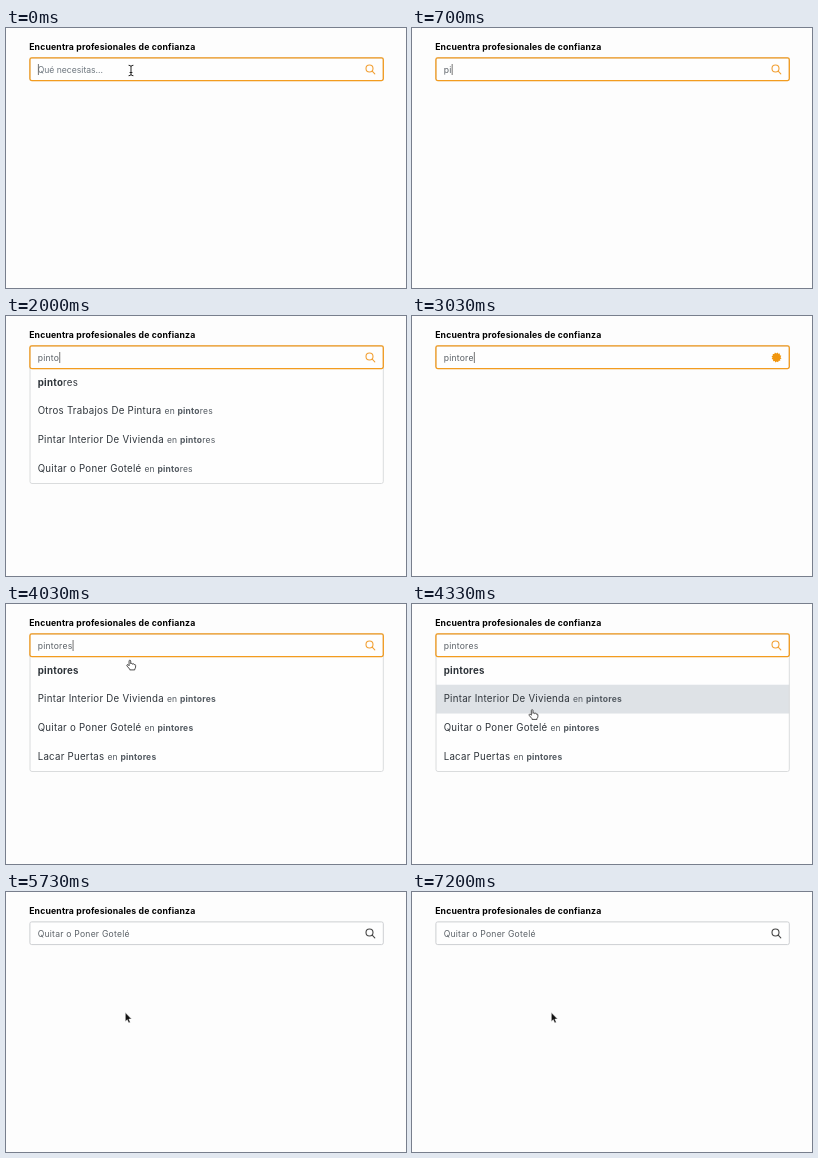
An HTML page for the animation above (7.23 s loop, 400 px wide and 260 px high).

```html
<!DOCTYPE html>
<html lang="es">
<head>
<meta charset="utf-8">
<title>Buscador</title>
<style>
  html, body { margin: 0; width: 100%; height: 100%; overflow: hidden; background: #fdfdfd; }
  svg { display: block; width: 400px; height: 260px; font-family: Inter, "Open Sans", sans-serif; }
  .title { font-size: 8.7px; font-weight: 700; letter-spacing: .16px; fill: #000; }
  .value { font-size: 8.6px; letter-spacing: .22px; fill: #5b6167; }
  .hint { letter-spacing: 0; fill: #6c757d; }
  .row { font-size: 9.7px; letter-spacing: .25px; fill: #2f353b; }
  .sub { font-size: 8.5px; letter-spacing: .21px; fill: #535a61; }
  .b { font-weight: 700; }
  .line { fill: none; stroke-linecap: round; }
</style>
</head>
<body>
<svg viewBox="0 0 400 260">
  <text class="title" x="23.2" y="21.6">Encuentra profesionales de confianza</text>
  <g id="menu">
    <path d="M24 50V165.5a2 2 0 0 0 2 2H375.3a2 2 0 0 0 2-2V50Z" fill="#fefefe"/>
    <rect id="hover" x="24" width="353.3" height="28.8" fill="#dee2e6"/>
    <path d="M24 50V165.5a2 2 0 0 0 2 2H375.3a2 2 0 0 0 2-2V50" fill="none" stroke="#d6d8da" stroke-width=".9"/>
    <g id="rows"></g>
  </g>
  <rect x="23.9" y="29.9" width="353.4" height="22.7" rx="1.8" fill="#fefefe" stroke="#cdcfd2"/>
  <rect id="focus" x="23.9" y="29.9" width="353.4" height="22.7" rx="1.8" fill="none" stroke="#f39c1f" stroke-width="1.3"/>
  <text id="value" class="value" x="31.7" y="44.5"></text>
  <rect id="caret" y="36" width=".9" height="11" fill="#666"/>
  <g id="lens" class="line" stroke-width="1.1">
    <circle cx="363.5" cy="40.5" r="3.5"/>
    <path d="M366.2 43.2L368.8 45.8"/>
  </g>
  <path id="spinner" fill="#f0960f"/>
  <path id="beam" class="line" d="M-2-5.2Q0-5.2 0-4Q0-5.2 2-5.2M0-4V4M-2 5.2Q0 5.2 0 4Q0 5.2 2 5.2M-1 2H1" stroke="#222"/>
  <g id="hand">
    <path transform="scale(.87)" d="M-.9 1Q-.9 0 0 0T1 1V4.2Q1.3 3.5 2.2 3.7T3 4.6Q3.6 3.8 4.4 4.2T5 5.2Q6.5 4.6 6.6 6V8Q6.4 9.4 5.6 10.2V11.2H-.1V10.4L-3.2 6.8Q-4 5.7-3 5.2T-.9 6.4Z" fill="#fff" stroke="#333" stroke-linejoin="round"/>
  </g>
  <path id="arrow" d="M0 0V8.9L2 7.1L3.4 10.4L5 9.7L3.6 6.5H6.3Z" fill="#111" stroke="#fff" stroke-width=".5"/>
</svg>
<script>
const LOOP = 7230, STEP = 100 / 3;
const BLUR = 5550, PICK = 5670;
const ROW_TOP = 51.9, ROW_H = 28.8;
const PLACE = "Qué necesitas...", CHOICE = "Quitar o Poner Gotelé";
const INTERIOR = "Pintar Interior De Vivienda", DOORS = "Lacar Puertas";
const BASE = [INTERIOR, CHOICE, DOORS];
const WIDE = ["Otros Trabajos De Pintura", INTERIOR, CHOICE];

// key time, query, time the answer arrives, suggestions
const KEYS = [
  [300, "p", 500, null],
  [500, "pi", 700, null],
  [970, "pin", 1200, BASE],
  [1370, "pint", 1530, BASE],
  [1800, "pinto", 2000, WIDE],
  [2570, "pintor", 2730, BASE],
  [3030, "pintore", 3230, BASE],
  [3530, "pintores", 3770, BASE]
];
const CARET_OFF = [[2300, 2570], [4070, 4550], [5030, 5530]];

const $ = id => document.getElementById(id);
const clamp = v => Math.max(0, Math.min(1, v));
const show = (id, on) => $(id).setAttribute("visibility", on ? "visible" : "hidden");
const place = (id, x, y) => $(id).setAttribute("transform", `translate(${x} ${y})`);

const TEETH = 12;
$("spinner").setAttribute("d", "M" + Array.from({ length: TEETH * 2 }, (_, i) => {
  const a = i * Math.PI / TEETH, r = i % 2 ? 4 : 5.1;
  return (r * Math.cos(a)).toFixed(2) + " " + (r * Math.sin(a)).toFixed(2);
}).join("L") + "Z");

const mark = (text, query) =>
  text.replace(new RegExp(query, "i"), `<tspan class="b">${query}</tspan>`);

let listed = "";
function fillRows(query, items) {
  if (listed === query) return;
  listed = query;
  const lines = [mark("pintores", query), ...items.map(item =>
    `${mark(item, query)} <tspan class="sub">en ${mark("pintores", query)}</tspan>`)];
  $("rows").innerHTML = lines.map((line, i) =>
    `<text class="row" x="31.7" y="${69.5 + i * ROW_H}">${line}</text>`).join("");
}

let typed = null;
function setValue(text) {
  if (typed === text) return;
  typed = text;
  const el = $("value");
  el.textContent = text;
  el.classList.toggle("hint", text === PLACE);
  const width = text === PLACE ? 0 : el.getComputedTextLength();
  $("caret").setAttribute("x", 31.9 + width);
}

// tip of the pointer on its way down to the third row
function glide(t) {
  const e = 1 - (1 - clamp((t - 3970) / 660)) ** 2.1;
  return [125 - 6 * e, 41 + 79.5 * e];
}

function draw(t) {
  const tick = Math.floor((t + 4) / STEP) * STEP;
  const key = KEYS.filter(k => k[0] <= t).pop();
  const picked = t >= PICK;
  const waiting = !!key && t < key[2];
  const open = !!key && !!key[3] && !waiting && !picked;

  setValue(picked ? CHOICE : key ? key[1] : PLACE);
  show("caret", t < BLUR && !CARET_OFF.some(([a, b]) => t >= a && t < b));

  const fade = clamp((tick - BLUR) / 170);
  $("focus").setAttribute("opacity", 1 - fade * fade * (3 - 2 * fade));
  $("lens").setAttribute("stroke", t < BLUR ? "#f2a034" : "#444");
  show("lens", !waiting);
  show("spinner", waiting);
  $("spinner").setAttribute("transform", `translate(364.5 41.4) rotate(${tick * .36})`);

  const [x, y] = glide(tick);
  const moving = t >= 3970;
  const onMenu = moving && y > 53 && !picked;
  show("beam", t < 300 || (moving && y <= 53));
  place("beam", x, t < 300 ? 42.5 : y + 1.5);
  show("hand", onMenu);
  place("hand", x, y);

  // the highlight trails the pointer by one step
  const row = Math.floor((glide(tick - STEP)[1] - ROW_TOP) / ROW_H);
  show("menu", open);
  if (open) fillRows(key[1], key[3]);
  show("hover", open && onMenu && row >= 0);
  $("hover").setAttribute("y", ROW_TOP + ROW_H * row);

  show("arrow", picked);
  place("arrow", 119.3 + 20 * clamp((tick - 7066) / 130), 120.6);
}

const start = performance.now();
function frame() {
  draw((performance.now() - start) % LOOP);
  requestAnimationFrame(frame);
}
draw(0);
requestAnimationFrame(frame);
</script>
</body>
</html>
```
